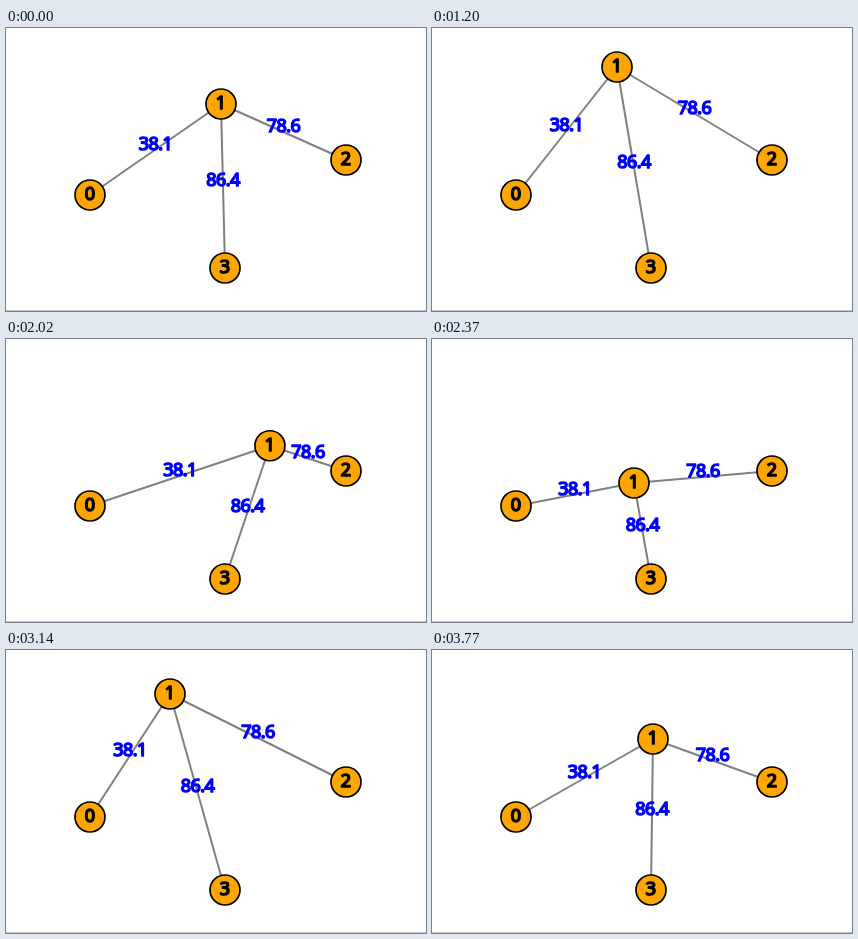
An HTML page with a canvas for the animation above (4.5 s loop, 420 by 283 pixels).

```html
<!DOCTYPE html>
<html lang="en">
<head>
<meta charset="utf-8">
<title>Dragging a graph node</title>
<style>
  html, body { margin: 0; width: 100%; height: 100%; overflow: hidden; background: #fff; }
  canvas { display: block; }
</style>
</head>
<body>
<canvas id="stage" width="420" height="283"></canvas>
<script>
const ctx = document.getElementById('stage').getContext('2d');
const LOOP = 4500;
const RADIUS = 15;
const LAST_STEP = 42;
const nodes = [[84, 167], [215, 76], [340, 132], [219, 240]];
const edges = [[0, '38.1'], [2, '78.6'], [3, '86.4']];

// Turning points of the dragged node
const path = [
  { step: -1, x: 215, y: 76 },
  { step: 5, x: 185, y: 39 },
  { step: 8, x: 209, y: 17 },
  { step: 13, x: 270, y: 50 },
  { step: 15, x: 283, y: 84 },
  { step: 22, x: 202, y: 144 },
  { step: 29, x: 122, y: 78 },
  { step: 33, x: 164, y: 44 },
  { step: 37, x: 213, y: 59 },
  { step: LAST_STEP, x: 221, y: 89 }
];

// The drag is redrawn in discrete steps
function stepAt(t) {
  const step = t < 1950 ? (t - 860) / 67.1 : 16 + (t - 1950) / 70;
  return Math.max(-1, Math.min(LAST_STEP, Math.floor(step + 1e-6)));
}

function slope(i, axis) {
  const a = path[i - 1], b = path[i + 1];
  return a && b ? (b[axis] - a[axis]) / (b.step - a.step) : 0;
}

// Cubic Hermite curve through the turning points
function positionAt(step) {
  const i = Math.max(0, path.findIndex(p => p.step >= step) - 1);
  const a = path[i], b = path[i + 1], span = b.step - a.step;
  const u = (step - a.step) / span, v = 1 - u;
  return ['x', 'y'].map(axis =>
    v * v * (1 + 2 * u) * a[axis] + u * u * (3 - 2 * u) * b[axis] +
    span * u * v * (v * slope(i, axis) - u * slope(i + 1, axis)));
}

function line(x1, y1, x2, y2, color, width) {
  ctx.strokeStyle = color;
  ctx.lineWidth = width;
  ctx.beginPath();
  ctx.moveTo(x1, y1);
  ctx.lineTo(x2, y2);
  ctx.stroke();
}

function label(text, x, y, color) {
  ctx.fillStyle = ctx.strokeStyle = color;
  ctx.lineWidth = 1.7;
  ctx.fillText(text, x, y);
  ctx.strokeText(text, x, y);
}

function draw(t) {
  ctx.fillStyle = '#fff';
  ctx.fillRect(0, 0, 420, 283);
  line(0, 282.5, 420, 282.5, '#c8c8c8', 1);

  nodes[1] = positionAt(stepAt(t));
  const [hubX, hubY] = nodes[1];
  for (const [end] of edges) line(hubX, hubY, ...nodes[end], '#808080', 2);

  ctx.font = '18px "Open Sans", "Noto Sans", sans-serif';
  ctx.textAlign = 'center';
  ctx.lineJoin = 'round';
  ctx.letterSpacing = '-0.6px';
  for (const [end, text] of edges) {
    const [x, y] = nodes[end];
    label(text, (hubX + x) / 2, (hubY + y) / 2, '#00f');
  }

  ctx.letterSpacing = '0px';
  nodes.forEach(([x, y], i) => {
    ctx.beginPath();
    ctx.arc(x, y, RADIUS, 0, 2 * Math.PI);
    ctx.fillStyle = '#ffa500';
    ctx.fill();
    ctx.strokeStyle = '#000';
    ctx.lineWidth = 1.7;
    ctx.stroke();
    label(i, x, y + 5, '#000');
  });
}

const start = performance.now();
function tick() {
  draw((performance.now() - start) % LOOP);
  requestAnimationFrame(tick);
}
tick();
</script>
</body>
</html>
```
